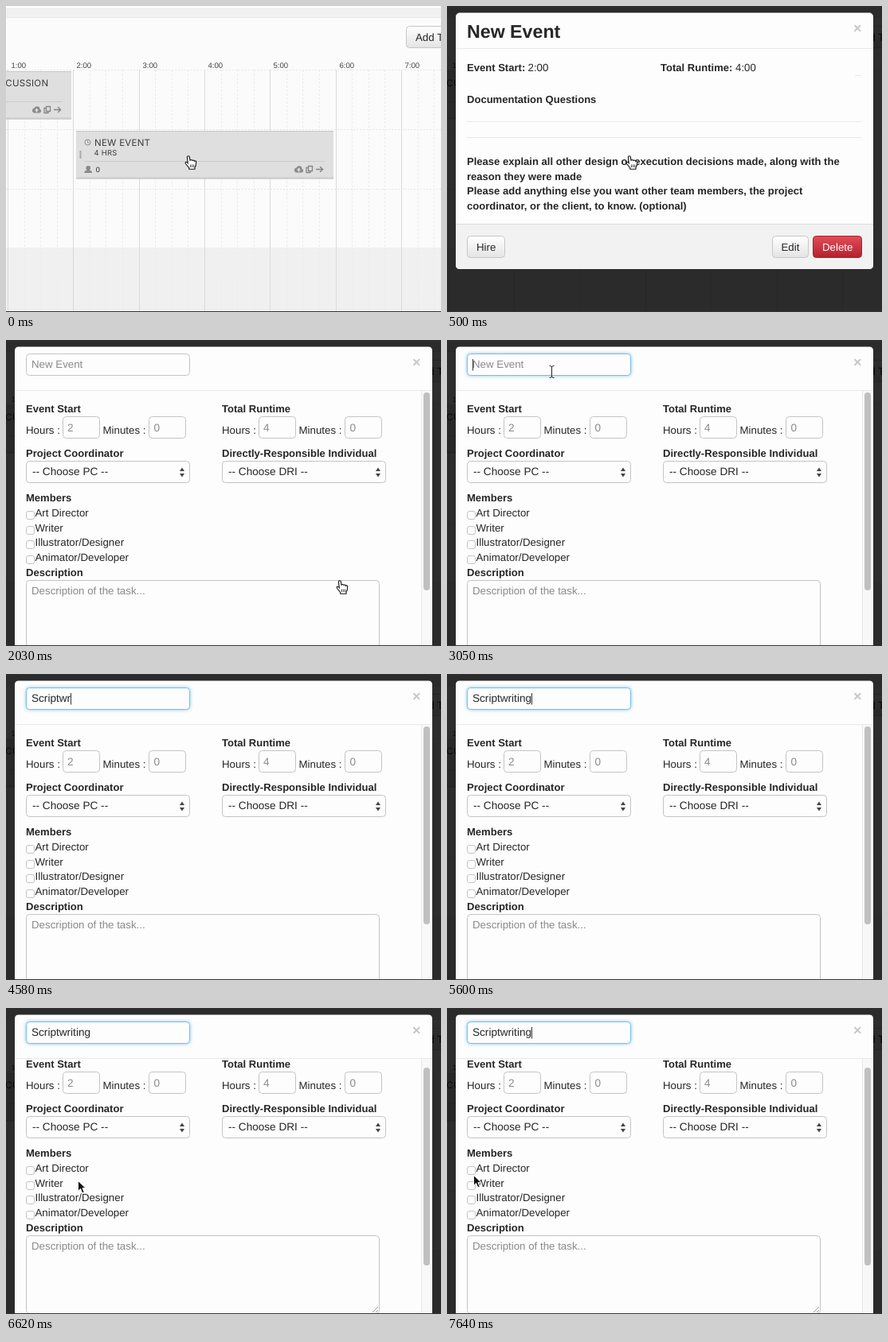
Write an HTML page that moves like this. It is 546x385 px and loops after 8000 ms.

```html
<!DOCTYPE html>
<html lang="en">
<head>
<meta charset="utf-8">
<title>Event editor</title>
<style>
  html, body { margin: 0; width: 100%; height: 100%; overflow: hidden; background: #fbfbfb }
  svg { display: block; width: 546px; height: 385px }
  text { font: 13.3px "Liberation Sans", Arial, sans-serif; fill: #262626; white-space: pre; text-rendering: geometricPrecision }
  .b { font-size: 13.05px; font-weight: bold }
  .h { font-size: 23.2px; font-weight: bold }
  .wide { font-size: 13.6px }
  .hint { fill: #8a8a8a }
  .tick { font-size: 9.6px; fill: #444 }
  .caps { font: 11.5px Inter, sans-serif; letter-spacing: .25px; fill: #3a3a3a }
  .small { font-size: 9.2px }
  .field { fill: #fdfdfd; stroke: #c4c4c4 }
  .focus { stroke: #7cbdea; filter: drop-shadow(0 0 2px #7cc4f4) }
  .rule { stroke: #e9e9e9; fill: none }
</style>
</head>
<body>
<svg viewBox="0 0 546 385">
  <defs>
    <linearGradient id="light" x2="0" y2="1"><stop stop-color="#fff"/><stop offset="1" stop-color="#e4e4e4"/></linearGradient>
    <linearGradient id="red" x2="0" y2="1"><stop stop-color="#e04e5a"/><stop offset="1" stop-color="#b5202c"/></linearGradient>
    <clipPath id="body"><path d="M11 64H535V385H11z"/></clipPath>
    <g id="card">
      <path d="M88 158H411V218H88z" fill="#bbb" opacity=".6"/>
      <path d="M88 157H411V216H88z" fill="#dfdfdf"/>
      <path d="M88 157.5H411M88 216H411" stroke="#c8c8c8"/>
      <path d="M99 195.5H400" stroke="#b9b9b9" stroke-dasharray="1 1"/>
      <g fill="#8a8a8a">
        <circle cx="365" cy="206.5" r="3"/><circle cx="368" cy="204.5" r="3.3"/><circle cx="370.5" cy="207" r="2.5"/>
        <path d="M365 206.5H370.5V209.5H365z"/>
        <path d="M367.5 203.5l2.6 3h-1.7v2h-1.8v-2h-1.7z" fill="#dfdfdf"/>
      </g>
      <path d="M379.5 201.5h5v6h-5zM379 203.5h-2v6h5v-2M389 205.5h8.5M394 202l3.7 3.5-3.7 3.5" fill="none" stroke="#858585" stroke-width="1.3"/>
    </g>
  </defs>

  <g id="page">
    <path d="M0 0H546V385H0z" fill="#fbfbfb"/>
    <path d="M0 3H546V14H0z" fill="#f1f1f1"/>
    <path d="M0 3.5H546M0 14.5H546" stroke="#e9e9e9"/>
    <rect x="502.5" y="25.5" width="90" height="27" rx="4" fill="url(#light)" stroke="#c6c6c6"/>
    <text x="514" y="44">Add Team</text>
    <path d="M0 304H546V385H0z" fill="#f0f0f0"/>
    <g id="grid"></g>
    <use href="#card" x="-329" y="-75"/>
    <text class="caps" x="53.3" y="101" text-anchor="end">DISCUSSION</text>
    <use href="#card"/>
    <path d="M93.5 182V192" stroke="#aaa" stroke-width="2"/>
    <circle cx="102.5" cy="171.5" r="3.5" fill="none" stroke="#8a8a8a"/>
    <path d="M102.5 169V172H104.5" fill="none" stroke="#8a8a8a" stroke-width=".8"/>
    <text class="caps" x="111" y="175.5">NEW EVENT</text>
    <text class="caps" x="110.5" y="187.5" style="font-size:9.4px">4 HRS</text>
    <path d="M98.5 210v-1.5q0-1 3-1.8-1.4-1.7-1.2-3.5.3-2.2 2.9-2.2t2.9 2.2q.2 1.8-1.2 3.5 3 .8 3 1.8V210z" fill="#8a8a8a"/>
    <text class="small" x="112.8" y="209">0</text>
  </g>

  <g id="shade">
    <path d="M0 0H546V385H0z" opacity=".82"/>
  </g>

  <g id="info">
    <rect x="11" y="8.5" width="524" height="322.5" rx="5" fill="#fdfdfd"/>
    <path d="M11 275H535V326q0 5-5 5H16q-5 0-5-5z" fill="#f2f2f2"/>
    <path class="rule" d="M11 53.5H535M25 145.5H521M25 165.5H521M512 87.5H520"/>
    <path d="M11 274.5H535" stroke="#dcdcdc"/>
  </g>

  <g id="form">
    <path d="M11 385V13.5q0-5 5-5H530q5 0 5 5V385z" fill="#fdfdfd"/>
    <path class="rule" d="M11 63.5H535"/>
    <path d="M521 64H535V385H521z" fill="#f8f8f8"/>
    <path class="rule" d="M521.5 64V385"/>
    <rect id="thumb" x="524" y="66" width="8" height="249" rx="4" fill="#c0c0c0"/>
    <rect id="title" class="field" x="25.5" y="17.5" width="205" height="27" rx="4"/>
    <text id="hint" class="hint" x="32" y="35">New Event</text>
    <text id="typed" class="wide" x="32" y="35"></text>
    <path id="caret" d="M0 24V38.5" stroke="#333"/>
    <g clip-path="url(#body)"><g id="scroll"></g></g>
  </g>

  <text id="close" x="510" y="34" style="font-size:18px;font-weight:bold;fill:#c6c6c6">×</text>
  <path d="M0 384.5H546" stroke="#333"/>

  <g id="hand"><path d="M-3.6-6.4q0-1.8 1.5-1.8t1.6 1.8l.5 4q.2-1.2 1.4-1.1 1.3.1 1.4 1.3.3-.9 1.4-.8t1.3 1.3q.4-.6 1.2-.4 1 .2 1 1.7 0 4.4-1.7 6.5V8.3H-1.2V6.6L-5.4 1.5q-1-1.6.3-2.2 1-.4 2.4 1.4z" fill="#fff" stroke="#111" stroke-width="1.1"/><path d="M.5 2.5V6M2.6 2.5V6M4.6 2.5V6" stroke="#111" stroke-width=".8"/></g>
  <path id="arrow" d="M.5.5V13.2L3.5 10.4 5.8 15.8 8.2 14.8 5.9 9.6H10z" fill="#111" stroke="#fff" stroke-width=".9"/>
  <path id="beam" d="M-3-7.5Q0-7.5 0-6V6Q0 7.5-3 7.5M3-7.5Q0-7.5 0-6M0 6Q0 7.5 3 7.5" fill="none" stroke="#222"/>
</svg>
<script>
const $ = id => document.getElementById(id);
const add = (id, markup) => $(id).insertAdjacentHTML('beforeend', markup);
const label = (x, y, s, cls = '') => `<text x="${x}" y="${y}" class="${cls}">${s}</text>`;
const field = (x, y, w, h = 27, r = 4) =>
  `<rect class="field" x="${x + .5}" y="${y + .5}" width="${w}" height="${h}" rx="${r}"/>`;
const show = (id, on) => $(id).style.display = on ? '' : 'none';

// Timeline: hour lines, dashed quarter lines, row lines
let grid = '<path d="M0 80.5H546M0 155.5H546M0 230.5H546" stroke="#e6e6e6" stroke-dasharray="2 2"/>';
for (let q = 0; q < 27; q++) {
  const x = Math.round(2 + q * 20.58) + .5, hour = q % 4 === 0;
  grid += `<path d="M${x} 80V384" stroke="${hour ? '#dadada' : '#ececec'}"${hour ? '' : ' stroke-dasharray="3 2"'}/>`;
  if (hour) grid += label(x + 4, 77.5, q / 4 + 1 + ':00', 'tick');
}
add('grid', grid);

const button = (x, w, tx, s, fill = 'light') =>
  `<rect x="${x + .5}" y="289.5" width="${w}" height="27" rx="4" fill="url(#${fill})" stroke="${fill === 'red' ? '#a8202c' : '#c6c6c6'}"/>` +
  `<text x="${tx}" y="307.5"${fill === 'red' ? ' style="fill:#fff"' : ''}>${s}</text>`;
add('info',
  label(25, 39.5, 'New Event', 'h') +
  label(25, 82, 'Event Start:', 'b') + label(101.5, 82, '2:00') +
  label(268, 82, 'Total Runtime:', 'b') + label(362, 82, '4:00') +
  label(25, 121.5, 'Documentation Questions', 'b') +
  ['Please explain all other design or execution decisions made, along with the',
   'reason they were made',
   'Please add anything else you want other team members, the project',
   'coordinator, or the client, to know. (optional)']
    .map((s, i) => label(25, 200 + i * 18.7, s, 'b')).join('') +
  button(25, 47, 37, 'Hire') + button(408, 45, 419.5, 'Edit') + button(459, 61, 471, 'Delete', 'red'));

const column = (x, head, hours, role, choice) =>
  label(x, 91, head, 'b') + label(x, 118, 'Hours :') + label(x + 96.5, 118, 'Minutes :') +
  field(x + 46, 96, 46) + label(x + 52, 114.5, hours, 'hint wide') +
  field(x + 154, 96, 46) + label(x + 160.5, 114.5, '0', 'hint wide') +
  label(x, 147, role, 'b') + field(x, 152, 205) + label(x + 8, 169.7, choice, 'wide') +
  `<path d="M${x + 193} 165l3-4.5 3 4.5zM${x + 193} 168l3 4.5 3-4.5z" fill="#444"/>`;
add('scroll',
  column(25, 'Event Start', 2, 'Project Coordinator', '-- Choose PC --') +
  column(271, 'Total Runtime', 4, 'Directly-Responsible Individual', '-- Choose DRI --') +
  label(25, 203.3, 'Members', 'b') +
  ['Art Director', 'Writer', 'Illustrator/Designer', 'Animator/Developer']
    .map((s, i) => field(25, Math.round(215 + i * 18.7), 10, 10, 2.5) + label(36.5, 222 + i * 18.7, s)).join('') +
  label(25, 297, 'Description', 'b') + field(25, 302, 443, 98) +
  label(32, 320, 'Description of the task...', 'hint') +
  '<path d="M460 399l7-7M464 399l3-3" stroke="#999"/>');

// start, view, pointer, x, y, letters typed (-1: not focused), caret, scrolled
const steps = [
  [0, 'page', 'hand', 231, 197],
  [500, 'info', 'hand', 231, 197],
  [1010, 'info', 'beam', 148, 243],
  [1520, 'info', 'arrow', 405, 302],
  [2030, 'form', 'hand', 421, 311, -1],
  [2540, 'form', 'arrow', 136, 48, -1],
  [3050, 'form', 'beam', 131.5, 40, 0, 1],
  [3560, 'form', '', 0, 0, 1, 1],
  [4070, 'form', '', 0, 0, 5, 1],
  [4580, 'form', '', 0, 0, 8, 1],
  [5090, 'form', '', 0, 0, 10, 1],
  [5600, 'form', '', 0, 0, 13, 1],
  [6110, 'form', 'hand', 110, 186, 13, 1],
  [6620, 'form', 'arrow', 90, 217, 13, 0, 1],
  [7130, 'form', 'arrow', 107, 37, 13, 0, 1],
  [7640, 'form', 'arrow', 33, 210, 13, 1, 1]
];

let shown;
function draw() {
  const t = performance.now() % 8000;
  const step = steps.findLast(s => s[0] <= t);
  if (step !== shown) {
    shown = step;
    const [, view, pointer, x, y, typed = -1, caret, scrolled] = step;
    show('info', view === 'info');
    show('form', view === 'form');
    show('shade', view !== 'page');
    show('close', view !== 'page');
    for (const id of ['hand', 'arrow', 'beam']) {
      show(id, id === pointer);
      $(id).setAttribute('transform', `translate(${x} ${y})`);
    }
    $('title').classList.toggle('focus', typed >= 0);
    $('typed').textContent = 'Scriptwriting'.slice(0, Math.max(typed, 0));
    show('hint', typed <= 0);
    show('caret', caret);
    const end = typed > 0 && view === 'form' ? $('typed').getComputedTextLength() : 0;
    $('caret').setAttribute('transform', `translate(${Math.floor(32 + end) + .5} 0)`);
    $('scroll').setAttribute('transform', `translate(0 ${scrolled ? -16 : 0})`);
    $('thumb').setAttribute('y', scrolled ? 75 : 66);
  }
  requestAnimationFrame(draw);
}
draw();
</script>
</body>
</html>
```
